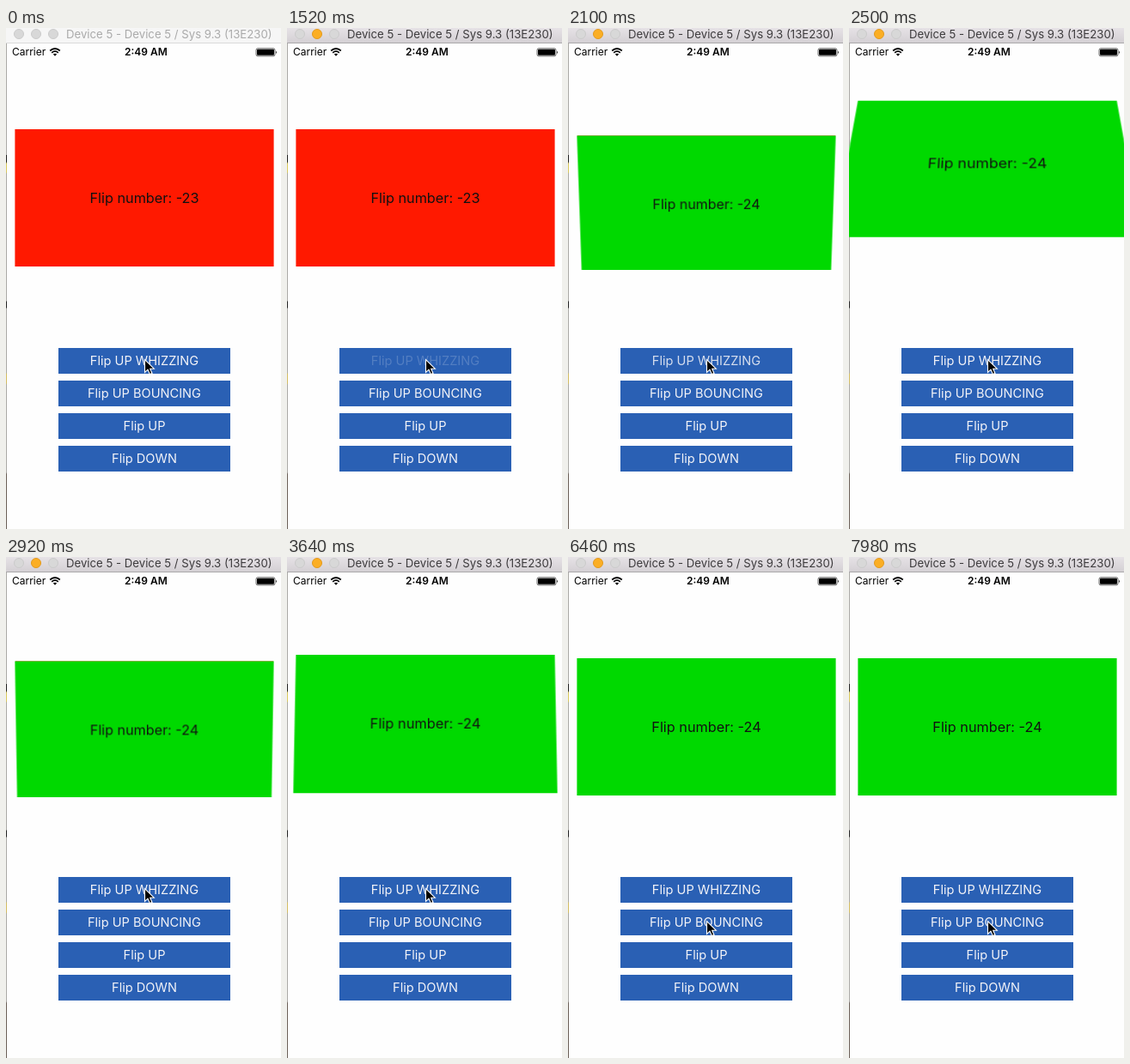
Animation of 320x584 px, one loop 8000 ms. Source, as an HTML page:

```html
<!DOCTYPE html>
<html lang="en">
<head>
<meta charset="utf-8">
<title>Flip demo</title>
<style>
  html, body { margin: 0; width: 100%; height: 100%; overflow: hidden; background: #fefefe; }
  body { position: relative; font-family: Inter, Roboto, sans-serif; }
  #stage { position: absolute; left: 0; top: 0; width: 320px; height: 584px; overflow: hidden; background: #fefefe; }
  #stage div, #stage svg, #stage span { position: absolute; }
  #stage span { white-space: pre; }

  .edge { left: 0; top: 18px; width: 1px; height: 566px;
    background: linear-gradient(#aaa9a6 130px, #222 130px 138px, #d9c95c 140px 150px, #aaa9a6 152px 300px,
      #222 301px 308px, #aaa9a6 309px 384px, #d3bd61 385px 396px, #aaa9a6 398px 500px, #6b6058 502px); }

  .bar { left: 0; top: 0; width: 320px; height: 17px; background: #f6f6f6; border-bottom: 1px solid #dadada; color: #aaa; }
  .bar.active { background: linear-gradient(#e6e2e6, #d4d0d4); border-color: #aaa8aa; color: #3c3a3c; }
  .bar div { top: 1px; width: 10px; height: 10px; border: 1px solid #cbcbcb; border-radius: 50%; background: #d8d8d8; }
  .bar.active div:nth-child(2) { background: #fbae24; border-color: #e39a1d; }
  .bar span { left: 70px; top: 0; font-size: 13.2px; line-height: 15px; }

  .status span { top: 20px; font-size: 12px; line-height: 16px; color: #000; }

  .flip { left: 10px; top: 118px; width: 302px; height: 160px; perspective: 320px; }
  .face { left: 0; top: 0; width: 300px; height: 160px; border: solid #fff6; border-width: 0 1px;
    font-size: 16.25px; line-height: 160px; text-align: center; color: #111; }
  #before { background: #ff1900; transform-origin: 50% 100%; }
  #after { background: #00d900; transform-origin: 50% 0; }

  .button { left: 61px; width: 200px; height: 30px; background: #2a60b4; color: #f4f4f8;
    font-size: 14.6px; line-height: 30px; text-align: center; }
  #cursor { left: 160px; top: 385px; }
</style>
</head>
<body>
<div id="stage">
  <div class="edge"></div>
  <div class="status">
    <span style="left:7px">Carrier</span>
    <span style="left:138px;font-weight:600">2:49 AM</span>
    <svg style="left:50px;top:22px" width="14" height="12" fill="none" stroke="#000" stroke-width="1.7">
      <path d="M1.2 4.5Q7 -.5 12.8 4.5M3.2 6.8Q7 3.4 10.8 6.8"/>
      <path d="M7 10.8 4.8 8.6Q7 6.9 9.2 8.6Z" fill="#000" stroke="none"/>
    </svg>
    <svg style="left:290px;top:23px" width="27" height="11">
      <rect x="1" y=".8" width="22" height="9" rx="2" fill="none" stroke="#000" stroke-width=".6"/>
      <rect x="2" y="1.8" width="20" height="7" rx="1"/>
      <path d="M24.2 3.6Q26 5.4 24.2 7.2Z"/>
    </svg>
  </div>

  <div class="flip">
    <div class="face" id="after">Flip number: -24</div>
    <div class="face" id="before">Flip number: -23</div>
  </div>

  <div class="bar" id="bar">
    <div style="left:9px"></div><div style="left:29px"></div><div style="left:49px"></div>
    <span>Device 5 - Device 5 / Sys 9.3 (13E230)</span>
  </div>

  <div class="button" style="top:373px"><span id="label" style="position:static">Flip UP WHIZZING</span></div>
  <div class="button" style="top:411px">Flip UP BOUNCING</div>
  <div class="button" style="top:449px">Flip UP</div>
  <div class="button" style="top:487px">Flip DOWN</div>

  <svg id="cursor" width="14" height="21">
    <path d="M1.5 1.5V16.5L5 13.2 7.4 18.6 10 17.5 7.7 12.2H12.3Z" fill="#000" stroke="#fff" stroke-width="1.1"/>
  </svg>
</div>
<script>
  const LOOP = 8000;
  const ACTIVATE = 840, PRESS = 1480, RELEASE = 1651, FADE = 550;
  const MOVE_START = 5100, MOVE_END = 5600;
  const DECAY = 1.85, FREQUENCY = 11.08, HEIGHT = 160;
  const $ = id => document.getElementById(id);
  const [before, after, bar, label, cursor] = ['before', 'after', 'bar', 'label', 'cursor'].map($);

  const progress = (t, from, to) => Math.min(1, Math.max(0, (t - from) / (to - from)));
  const smooth = x => x * x * (3 - 2 * x);

  // Remaining part of the flip: 1 at release, oscillating down to 0.
  function spring(t) {
    if (t < RELEASE) return 1;
    const s = (t - RELEASE) / 1000;
    const p = Math.exp(-DECAY * s) *
      (Math.cos(FREQUENCY * s) + DECAY / FREQUENCY * Math.sin(FREQUENCY * s));
    return s > 3.6 ? 0 : p;
  }

  // Both faces share a hinge that slides up while they turn.
  function drawFlip(p) {
    before.style.visibility = p > 0 ? 'visible' : 'hidden';
    after.style.visibility = p < 1 ? 'visible' : 'hidden';
    before.style.zIndex = p > 0.5 ? 1 : 0;
    after.style.zIndex = p > 0.5 ? 0 : 1;
    before.style.transform = p === 1 ? 'none' :
      `translateY(${HEIGHT * (p - 1)}px) rotateX(${90 * (1 - p)}deg)`;
    after.style.transform = p === 0 ? 'none' :
      `translateY(${HEIGHT * p}px) rotateX(${-90 * p}deg)`;
  }

  function draw() {
    const t = performance.now() % LOOP;
    drawFlip(spring(t));
    bar.classList.toggle('active', t >= ACTIVATE);
    label.style.opacity = t < PRESS ? 1 : 0.2 + 0.8 * progress(t, RELEASE, RELEASE + FADE);
    cursor.style.transform = `translateY(${38 * smooth(progress(t, MOVE_START, MOVE_END))}px)`;
    requestAnimationFrame(draw);
  }
  draw();
</script>
</body>
</html>
```
